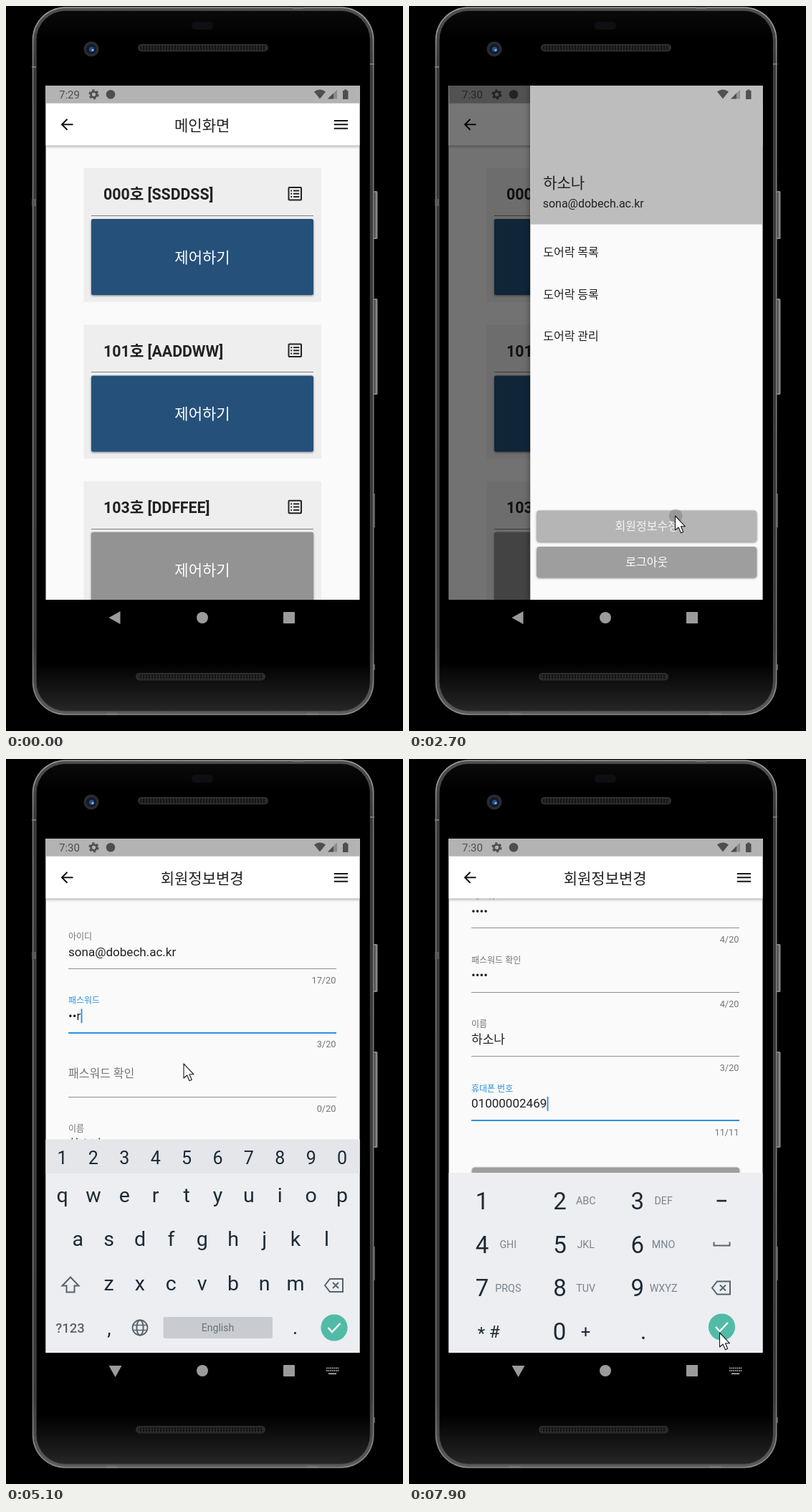
Recreate the animation shown at these times as an HTML page. Size 554x1011 px, loop 8000 ms.

```html
<!DOCTYPE html>
<html lang="ko">
<head>
<meta charset="utf-8">
<title>도어락 앱</title>
<style>
html, body { margin: 0; width: 100%; height: 100%; overflow: hidden; background: #000; }
svg { display: block; width: 100%; height: 100%; }
text { font-family: Roboto, "Noto Sans CJK KR", "Noto Sans CJK JP", "Noto Sans CJK", sans-serif; white-space: pre; }
.mid { text-anchor: middle; }
.end { text-anchor: end; }
.raised { filter: drop-shadow(0 1.5px 1.4px rgba(0,0,0,.48)); }
.bar { filter: drop-shadow(0 1px 2px rgba(0,0,0,.4)); }
.side { filter: drop-shadow(0 0 4px rgba(0,0,0,.45)); }
.line { fill: none; stroke-width: 2; }
.crisp { shape-rendering: crispEdges; }
</style>
</head>
<body>
<svg id="stage" viewBox="0 0 554 1011" preserveAspectRatio="none"></svg>
<script>
const LOOP = 8000, STEP = 100;
const NAME = '하소나', EMAIL = 'sona@dobech.ac.kr', PHONE = '0100000246';
const INK = '#212121', GREY = '#757575', BLUE = '#2b93e3', RULE = '#8f8f8f', KEY = '#1d2a35', KEY2 = '#59636c';

const rect = (x, y, w, h, fill, r = 0, extra = '') =>
  `<rect x="${x}" y="${y}" width="${w}" height="${h}" rx="${r}" fill="${fill}" ${extra}/>`;
const circle = (x, y, r, fill, extra = '') =>
  `<circle cx="${x}" cy="${y}" r="${r}" fill="${fill}" ${extra}/>`;
const path = (d, fill, extra = '') => `<path d="${d}" fill="${fill}" ${extra}/>`;
const line = (d, color, extra = '') => `<path d="${d}" class="line" stroke="${color}" ${extra}/>`;
// cy is the optical middle of the glyphs
const text = (x, cy, str, size, fill = INK, extra = '') =>
  `<text x="${x}" y="${cy + 0.36 * size}" font-size="${size}" fill="${fill}" ${extra}>${str}</text>`;
const mid = (x, cy, str, size, fill, extra = '') => text(x, cy, str, size, fill, 'class="mid" ' + extra);
const button = (x, y, w, h, fill, label, size, r = 4) =>
  rect(x, y, w, h, fill, r, 'class="raised"') + mid(x + w / 2, y + h / 2, label, size, '#fff');
const group = (id, body, extra = '') => `<g id="${id}" ${extra}>${body}</g>`;

function phoneBody() {
  const speaker = (x, y, w) =>
    rect(x, y, w, 10.5, '#2c2c2c', 5) + rect(x + 3, y + 2, w - 6, 6.5, 'url(#mesh)', 3);
  const side = (y, h) => rect(512, y, 6.5, h, '#858585', 1.5) + rect(513.5, y + 2, 2, h - 4, '#444');
  return side(258, 67) + side(408, 134) + rect(513, 680, 2, 47, '#555') + rect(513, 918, 2, 8, '#555') +
    rect(36.7, 1.2, 476.8, 987.6, 'url(#metal)', 46) +
    rect(38.3, 2.8, 473.6, 984.4, 'url(#bevel)', 44.5) +
    rect(42, 6.3, 466.4, 977, 'url(#glass)', 41, 'stroke="#4a4a4a" stroke-width="1"') +
    rect(36, 84, 6, 2, '#777') + rect(508, 80, 6, 2, '#777') + rect(36, 269, 6, 10, '#5a5a5a') +
    rect(400, 1, 15, 3, '#777') + rect(140, 986, 16, 3, '#777') + rect(420, 986, 16, 3, '#777') +
    rect(259, 22, 30, 11, '#0e0e13', 5) +
    circle(119, 60, 10.5, '#2b2c2f') + circle(119, 60, 7, '#111a2c') +
    circle(119.5, 60.5, 3.6, '#28508c') + circle(121, 61.5, 1.6, '#8fb4e6') +
    speaker(184, 53, 182) + speaker(181, 930, 181);
}

function card(y, name, fill) {
  let list = rect(394.5, y + 27, 17.5, 17.5, 'none', 1, 'stroke="#222" stroke-width="2"');
  for (const dy of [31.5, 35.7, 40])
    list += rect(397.2, y + dy - 0.9, 2, 1.9, '#222') + rect(401, y + dy - 0.9, 8.3, 1.9, '#222');
  return rect(108.5, y, 331.5, 186.7, '#eee') +
    text(136, y + 36.5, name, 21.31, INK, 'font-weight="700"') + list +
    rect(119, y + 65.7, 310, 1, '#7d7d7d', 0, 'class="crisp"') +
    button(119, y + 71, 310, 106, fill, '제어하기', 21, 2.5);
}

const FIELDS = [
  { label: '아이디', y: 292.5, max: 20 },
  { label: '패스워드', y: 381.8, max: 20 },
  { label: '패스워드 확인', y: 471.2, max: 20 },
  { label: '이름', y: 560.7, max: 20 },
  { label: '휴대폰 번호', y: 650.3, max: 11 },
];

const formPage = () => rect(55, 0, 440, 1011, '#fafafa') +
  group('scroll', FIELDS.map(({ label, y }, i) =>
    `<text id="label${i}" x="87">${label}</text>` +
    `<text id="value${i}" x="87" y="${y - 18}" font-size="17.05" fill="${INK}"></text>` +
    rect(87, y - 0.5, 374, 1, RULE, 0, `class="crisp" id="line${i}"`) +
    text(460.5, y + 16, '', 12.79, GREY, `class="end" id="count${i}"`)).join('') +
    rect(0, 0, 1.9, 20, BLUE, 0, 'id="caret"') +
    button(88, 715.5, 373, 53, '#9e9e9e', '탈퇴하기', 16) +
    button(88, 779, 373, 53, '#757575', '변경하기', 16));

const appBar = () => rect(55, 111, 439, 83.5, '#fff', 0, 'class="bar"') +
  rect(55, 111, 439, 24.7, '#b3b3b3') +
  line('M93.5 165.3H78.5M85.5 157.8L78 165.3L85.5 172.8', '#151515') +
  line('M457.8 160H477M457.8 165.3H477M457.8 170.7H477', '#151515') +
  mid(273.7, 166.3, '', 21, INK, 'id="title"');

const drawer = () => rect(0, 111, 324.5, 718, '#fafafa', 0, 'class="side"') +
  rect(0, 111, 324.5, 193.5, '#bdbdbd') +
  text(18, 246.5, NAME, 21) + text(17.5, 275, EMAIL, 15.99) +
  ['목록', '등록', '관리'].map((s, i) => text(18, 343 + i * 58.8, '도어락 ' + s, 16)).join('') +
  button(9, 703.5, 307, 43.5, '#bdbdbd', '회원정보수정', 16) +
  button(9, 754, 307, 43, '#9e9e9e', '로그아웃', 16) +
  group('press', rect(9, 703.5, 307, 43.5, 'rgba(0,0,0,.045)', 4) +
    circle(203, 711, 9, 'rgba(0,0,0,.17)', 'id="ripple"'));

const statusBar = () => `<g opacity=".56">` +
  text(74, 123.8, '', 15, '#000', 'id="clock"') +
  circle(122.5, 123.3, 4, 'none', 'stroke="#000" stroke-width="2.8"') +
  circle(122.5, 123.3, 6, 'none', 'stroke="#000" stroke-width="2.2" stroke-dasharray="3.3 2.98"') +
  circle(146, 123.3, 6.3, '#000') +
  path('M430 119.5Q438 113.5 446 119.5L438 129.5Z', '#000') +
  path('M462 116.5V129.5H449Z', '#000', 'opacity=".4"') +
  path('M457 121.5V129.5H449Z', '#000') +
  path('M470 118H472V116.5H475.5V118H477.5V130H470Z', '#000') + '</g>';

const check = (x, y) => circle(x, y, 18.6, '#52bba7') +
  line(`M${x - 8.5} ${y}L${x - 3} ${y + 6}L${x + 8.5} ${y - 6}`, '#fff', 'style="stroke-width:2.4"');
const erase = (x, y) =>
  line(`M${x - 13} ${y}L${x - 6} ${y - 9}H${x + 12}V${y + 9}H${x - 6}Z`, KEY2) +
  line(`M${x - 2} ${y - 4}l8 8M${x + 6} ${y - 4}l-8 8`, KEY2);

function letterKeys() {
  const row = (keys, x, base, size) => [...keys].map((k, i) =>
    mid(x + i * 43.4, base - 0.36 * size, k, size, KEY)).join('');
  return rect(55, 530.5, 439, 300, '#eceef2') + rect(55, 530.5, 439, 47.5, '#e4e6ea') +
    row('1234567890', 78.5, 565, 25) + row('qwertyuiop', 78.5, 617.5, 28.5) +
    row('asdfghjkl', 100.2, 679, 28.5) + row('zxcvbnm', 143.5, 741, 28.5) +
    line('M90 722.5L101.5 734.5H95.5V743.5H84.5V734.5H78.5Z', KEY2) + erase(458, 734) +
    mid(89.5, 793, '?123', 18.5, KEY2, 'font-weight="500"') +
    mid(144, 793, ',', 27, KEY) + mid(403.5, 792, '.', 27, KEY) +
    circle(187, 793, 10.5, 'none', `stroke="${KEY2}" stroke-width="1.8"`) +
    `<ellipse cx="187" cy="793" rx="4.6" ry="10.5" class="line" stroke="${KEY2}"/>` +
    line('M177.5 789.5H196.5M177.5 796.5H196.5', KEY2, 'style="stroke-width:1.7"') +
    rect(219.5, 778, 152.5, 30, '#c8cbd0', 3) + mid(295.5, 793, 'English', 14, '#6b7278') + check(458, 793);
}

function numberKeys() {
  const subs = ['', 'ABC', 'DEF', 'GHI', 'JKL', 'MNO', 'PRQS', 'TUV', 'WXYZ'];
  const keys = subs.map((s, i) => {
    const x = 102 + (i % 3) * 108.4, y = 616 + Math.floor(i / 3) * 60.7;
    return mid(x, y, i + 1, 33, KEY) + mid(x + 36.3, y, s, 14.3, '#7c838a');
  }).join('');
  return rect(55, 577, 439, 254, '#eceef2') + keys +
    rect(429.5, 614.8, 13.5, 2.6, KEY) + line('M425.5 673.5V678.5H447.5V673.5', KEY2) + erase(436, 737.5) +
    mid(101, 800, '*', 24, KEY) + mid(119.5, 798, '#', 24, KEY) + mid(210, 798, '0', 33, KEY) +
    mid(246.5, 798, '+', 24, KEY) + mid(327, 797, '.', 33, KEY) + check(436.5, 792);
}

function navBar() {
  let dots = rect(450, 856.3, 11, 1.8, '#aaa');
  for (let i = 0; i < 14; i++)
    dots += rect(447 + (i % 7) * 2.6, 848.5 + Math.floor(i / 7) * 3.6, 1.7, 1.8, '#aaa');
  return path('M143.5 853L159.5 844V862Z', '#9b9b9b', 'id="back"') +
    circle(274, 853, 8, '#9b9b9b') + rect(387, 845, 16, 16, '#9b9b9b', 1) + group('switcher', dots);
}

const shade = (id, stops) => `<linearGradient id="${id}" x2="0" y2="1">` +
  stops.map(([at, c]) => `<stop offset="${at}" stop-color="${c}"/>`).join('') + '</linearGradient>';

const stage = document.getElementById('stage');
stage.innerHTML = `<defs>
  <clipPath id="screen"><rect x="55.5" y="111" width="438" height="717"/></clipPath>` +
  shade('metal', [[0, '#a0a0a0'], [0.1, '#7c7c7c'], [0.9, '#747474'], [1, '#8c8c8c']]) +
  shade('bevel', [[0, '#505050'], [0.08, '#383838'], [0.9, '#383838'], [1, '#5c5c5c']]) +
  shade('glass', [[0, '#0a0a0a'], [0.04, '#000'], [0.93, '#000'], [1, '#262626']]) +
  `<pattern id="mesh" width="4" height="3" patternUnits="userSpaceOnUse">
  <rect width="4" height="3" fill="#151515"/><circle cx="2" cy="1.5" r="1" fill="#3b3b3b"/></pattern></defs>` +
  rect(0, 0, 554, 1011, '#000') + phoneBody() +
  '<g clip-path="url(#screen)">' +
  group('home', rect(55, 111, 440, 720, '#fafafa') + card(226, '000호 [SSDDSS]', '#25507a') +
    card(444.6, '101호 [AADDWW]', '#25507a') + card(662.8, '103호 [DDFFEE]', '#939393')) +
  group('form', formPage()) + appBar() +
  rect(55, 111, 440, 720, '#000', 0, 'id="scrim"') + group('drawer', drawer()) + statusBar() +
  group('letters', letterKeys()) + group('numbers', numberKeys()) + '</g>' + navBar() +
  path('M0 0V20L4.6 16L8 23.8L11.2 22.3L8 14.8H14Z', '#fff',
    'id="cursor" stroke="#1a1a1a" stroke-width="1.1" stroke-linejoin="round"');

const el = {};
stage.querySelectorAll('[id]').forEach(e => el[e.id] = e);
const set = (id, attrs) => { for (const k in attrs) el[id].setAttribute(k, attrs[k]); };
const show = (id, on) => el[id].style.display = on ? '' : 'none';
const move = (id, x, y) => set(id, { transform: `translate(${x} ${y})` });

const ramp = (t, a, b) => Math.min(1, Math.max(0, (t - a) / (b - a)));
const out = p => 1 - (1 - p) ** 2;
const mix = (a, b, p) => a + (b - a) * p;

// time, x, y
const CURSOR = [
  [1400, 534, 181], [1500, 500, 168], [1600, 477, 161], [1900, 477, 161], [2400, 371.5, 711],
  [2900, 371.5, 711], [3500, 222, 268], [3600, 202, 305], [3800, 170, 345], [4700, 170, 345],
  [5100, 248, 425], [6000, 248, 425], [6300, 150, 855], [6500, 150, 855], [6600, 284.5, 650],
  [6700, 289, 634], [7500, 289, 634], [7900, 433.5, 800],
];
const FOCUS = [[3900, 1], [5400, 2], [6500, -1], [6700, 4]];

function cursorAt(t) {
  const i = CURSOR.findIndex(k => k[0] > t);
  if (i < 0) return CURSOR[CURSOR.length - 1].slice(1);
  const a = CURSOR[i - 1], b = CURSOR[i], p = ramp(t, a[0], b[0]);
  return [mix(a[1], b[1], p), mix(a[2], b[2], p)];
}

function typed(t, times, focused) {
  const n = times.filter(at => at <= t).length;
  if (!n) return '';
  const last = focused && t - times[n - 1] < 900 ? 'qwrt'[n - 1] : '•';
  return '•'.repeat(n - 1) + last;
}

function drawForm(t) {
  const focus = FOCUS.reduce((f, [at, i]) => at <= t ? i : f, -1);
  const values = [EMAIL,
    typed(t, [4600, 4800, 5000, 5200], focus === 1),
    typed(t, [5600, 5700, 5800, 6000], focus === 2),
    NAME, PHONE + (t < 7200 ? '8' : t < 7400 ? '' : '9')];
  const floats = [1, ramp(t, 3800, 4000), ramp(t, 5300, 5500), 1, 1];
  FIELDS.forEach(({ y, max }, i) => {
    const on = i === focus, size = mix(16, 12, floats[i]), cy = y - mix(32.5, 44.7, floats[i]);
    set('label' + i, { y: cy + 0.36 * size, 'font-size': size, fill: on ? BLUE : GREY });
    set('line' + i, { y: y - (on ? 1 : 0.5), height: on ? 2 : 1, fill: on ? BLUE : RULE });
    el['value' + i].textContent = values[i];
    el['count' + i].textContent = values[i].length + '/' + max;
  });
  show('caret', focus > 0);
  if (focus > 0) {
    const w = values[focus] ? el['value' + focus].getComputedTextLength() : 0;
    set('caret', { x: 87.3 + w, y: FIELDS[focus].y - 33.5 });
  }
  move('scroll', 0, -146 * out(ramp(t, 6700, 7000)));
}

function draw(t) {
  const home = t < 2800;
  show('home', home);
  show('form', !home);
  el.title.textContent = home ? '메인화면' : '회원정보변경';
  el.clock.textContent = t < 1800 ? '7:29' : '7:30';

  const open = t <= 1700 ? 0 : t < 1800 ? 0.877 * ramp(t, 1700, 1800) : mix(0.877, 1, ramp(t, 1800, 1900));
  const drawerOn = home && open > 0;
  show('drawer', drawerOn);
  show('scrim', drawerOn);
  set('scrim', { opacity: 0.54 * open });
  move('drawer', mix(493.5, 169.2, open), 0);
  show('press', t >= 2600);
  set('ripple', { r: mix(4, 9.5, ramp(t, 2600, 2700)) });

  if (!home) drawForm(t);

  const keysA = t < 6000 ? out(ramp(t, 4000, 4300)) : 1 - ramp(t, 6300, 6500);
  const keysN = out(ramp(t, 6700, 7000));
  move('letters', 0, 298 * (1 - keysA));
  move('numbers', 0, 251 * (1 - keysN));
  show('letters', keysA > 0);
  show('numbers', keysN > 0);
  const keysOpen = Math.max(keysA, keysN) > 0;
  set('back', { transform: keysOpen ? 'rotate(-90 152.5 853)' : '' });
  show('switcher', keysOpen);

  show('cursor', t >= 1400);
  if (t >= 1400) move('cursor', ...cursorAt(t));
}

const start = performance.now();
function tick() {
  const t = (performance.now() - start) % LOOP;
  draw(Math.floor(t / STEP) * STEP);
  requestAnimationFrame(tick);
}
tick();
</script>
</body>
</html>
```
